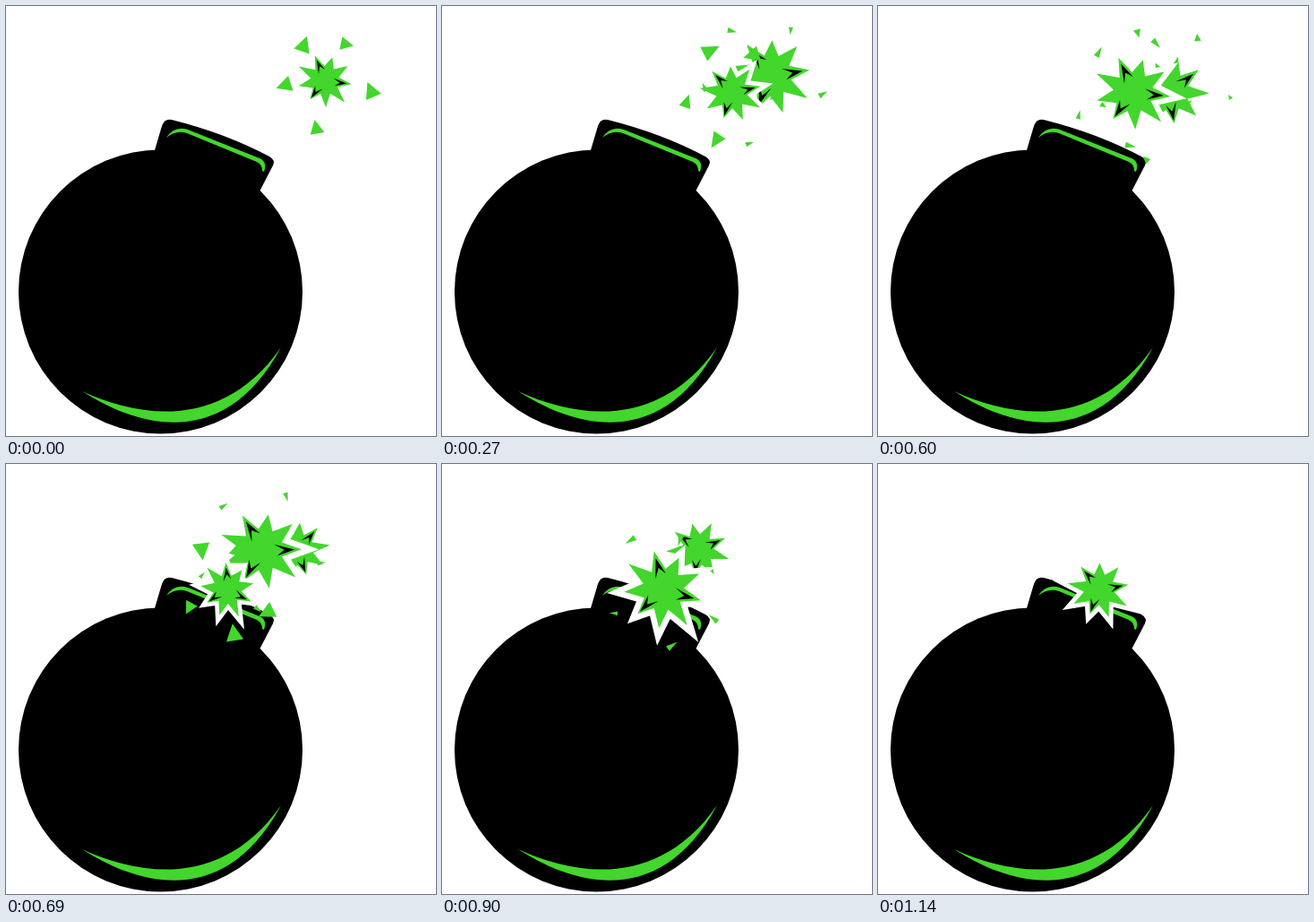
Animation of 480 by 480 pixels, one loop 1.17 s. Source, as an HTML page with a canvas:

```html
<!DOCTYPE html>
<html lang="en">
<head>
<meta charset="utf-8">
<title>Sparking bomb</title>
<style>
  html, body { margin: 0; width: 100%; height: 100%; overflow: hidden; background: #fff; }
  canvas { display: block; width: 480px; height: 480px; }
</style>
</head>
<body>
<canvas id="stage" width="480" height="480"></canvas>
<script>
const ctx = document.getElementById('stage').getContext('2d');
const LOOP = 1170, STEP = 30;
const SPARK_LIFE = 480, CHIP_LIFE = 390;
const SPIKES = 9, CHIPS = 5;
const GREEN = '#43d62c';
const TAU = Math.PI * 2;

const cap = new Path2D('M166 161L174 134Q177 125 185 127Q245 142 294 168Q301 172 298 178L283 207Z');
const rim = new Path2D('M179 147Q188 133 203 138L283 170Q292 174 288 185L286 184Q286 177 280 174L202 142Q190 138 179 147Z');
const shine = new Path2D('M85 430C150 472 245 496 307 381C242 474 150 460 85 430Z');
const slit = new Path2D('M.82 0L.3 -.13L.56 .01L.38 .16Z');
const chip = new Path2D('M1 0L-.75 -.9V.9Z');
const star = makeStar();

// Each spark lights the next one along the fuse; turn is in degrees
const sparks = [
  { birth: 0, x: 356, y: 83, turn: 8, drift: 5.5 },
  { birth: 240, x: 323, y: 97, turn: -12, drift: 1.5 },
  { birth: 450, x: 283, y: 97, turn: 13, drift: 1.5 },
  { birth: 690, x: 247, y: 140, turn: 27, drift: 0 }
];

function makeStar() {
  const path = new Path2D();
  for (let i = 0; i < SPIKES; i++) {
    const angle = i * TAU / SPIKES, valley = angle + TAU / SPIKES / 2;
    const length = 1 + 0.1 * Math.sin(i * TAU / 4);
    path.lineTo(length * Math.cos(angle), length * Math.sin(angle));
    path.lineTo(0.53 * Math.cos(valley), 0.53 * Math.sin(valley));
  }
  path.closePath();
  return path;
}

function random(seed) {
  const value = Math.sin(seed * 12.9898 + 4.1) * 43758.5453;
  return value - Math.floor(value);
}

function fillPath(path, color) {
  ctx.fillStyle = color;
  ctx.fill(path);
}

function drawBomb() {
  ctx.fillStyle = '#000';
  ctx.beginPath();
  ctx.arc(172.5, 319, 158.5, 0, TAU);
  ctx.fill();
  fillPath(cap, '#000');
  fillPath(rim, GREEN);
  fillPath(shine, GREEN);
}

function drawSpark({ birth, x, y, turn, drift }, time) {
  const age = time - birth;
  if (age < 0 || age >= SPARK_LIFE) return;
  const life = age / SPARK_LIFE;
  const radius = 30 + 14 * Math.sin(Math.PI * life);
  const travel = drift * Math.min(1, 2 * life);
  ctx.save();
  ctx.translate(x + 2 * travel, y - travel);
  ctx.rotate((turn - 40 * life ** 1.6) * TAU / 360);
  ctx.scale(radius, radius);
  ctx.lineWidth = 0.3;
  ctx.strokeStyle = '#fff';
  ctx.stroke(star);
  fillPath(star, GREEN);
  for (let i = 0; i < 3; i++) {
    fillPath(slit, '#000');
    ctx.rotate(TAU / 3);
  }
  ctx.restore();
}

function drawChips({ birth, x, y }, index, time) {
  const age = time - birth;
  if (age < 0 || age >= CHIP_LIFE) return;
  const life = age / CHIP_LIFE;
  for (let i = 0; i < CHIPS; i++) {
    const seed = index * CHIPS + i + 1;
    const angle = (i + 0.5 * random(seed)) * TAU / CHIPS;
    const distance = 44 + 10 * random(seed + 50) + 26 * life;
    const size = (7 + 5 * random(seed + 100)) * (1 - 0.6 * life);
    ctx.save();
    ctx.translate(x + distance * Math.cos(angle), y + distance * Math.sin(angle));
    ctx.rotate(TAU * (random(seed + 150) + life / 3));
    ctx.scale(size, size * (1 - 0.5 * Math.sin(Math.PI * life)));
    fillPath(chip, GREEN);
    ctx.restore();
  }
}

function render() {
  const time = Math.floor((performance.now() % LOOP) / STEP) * STEP;
  ctx.fillStyle = '#fff';
  ctx.fillRect(0, 0, 480, 480);
  drawBomb();
  sparks.forEach(spark => drawSpark(spark, time));
  sparks.forEach((spark, index) => drawChips(spark, index, time));
  requestAnimationFrame(render);
}
render();
</script>
</body>
</html>
```
